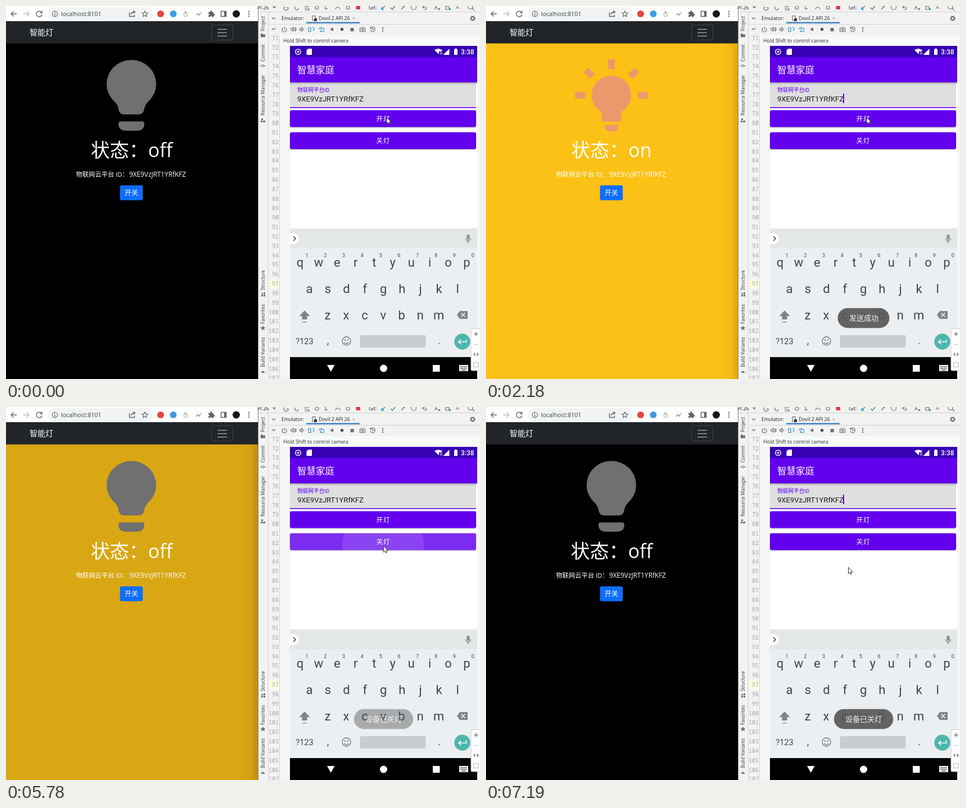
Recreate the animation shown at these times as an HTML page. Size 843x664 px, loop 7.49 s.

```html
<!DOCTYPE html>
<html lang="zh">
<head>
<meta charset="utf-8">
<title>智能灯</title>
<style>
  html, body { margin: 0; width: 100%; height: 100%; overflow: hidden; background: #fff; }
  svg { display: block; }
  text { font-family: "Open Sans", "Noto Sans CJK SC", "Noto Sans CJK", sans-serif; white-space: pre; }
  .app text { font-family: Roboto, "Noto Sans CJK SC", "Noto Sans CJK", sans-serif; }
  .mid { text-anchor: middle; }
  .line { fill: none; stroke: #5f6368; stroke-width: 1.4; }
  .ide .line { stroke: #6e6e6e; stroke-width: 1.2; }
  .side text { font-size: 8.3px; fill: #333; }
  #nums text { font: 10px "Noto Sans Mono", monospace; fill: #a8a8a8; text-anchor: end; }
  #keys text { fill: #37474f; text-anchor: middle; }
  .btn { fill: #6200ee; filter: drop-shadow(0 1px 1px rgba(0,0,0,.28)); }
  .toast, .ripple, #glow, #on, #caret { opacity: 0; }
  .toast rect { fill: #555; fill-opacity: .91; }
  .toast text { font-size: 13px; fill: #f2f2f2; text-anchor: middle; }
  .wave { transform-box: fill-box; transform-origin: center; }
</style>
</head>
<body>
<svg width="843" height="664" viewBox="0 0 843 664">
  <defs>
    <linearGradient id="shade"><stop offset="0" stop-opacity="0"/><stop offset=".6" stop-opacity=".04"/><stop offset="1" stop-opacity=".14"/></linearGradient>
    <linearGradient id="drop" x2="0" y2="1"><stop offset="0" stop-opacity=".25"/><stop offset="1" stop-opacity="0"/></linearGradient>
    <clipPath id="clip1"><rect x="505" y="185.500" width="331" height="30" rx="3"/></clipPath>
    <clipPath id="clip2"><rect x="505" y="224.700" width="331" height="30" rx="3"/></clipPath>
  </defs>

  <!-- web page -->
  <rect y="66" width="448" height="598"/>
  <rect id="glow" y="66" width="448" height="598" fill="#fbc116"/>
  <rect x="420" y="66" width="28" height="598" fill="url(#shade)"/>
  <rect y="27" width="448" height="39.600" fill="#212529"/>
  <text x="42" y="52" font-size="14" font-weight="500" fill="#fff">智能灯</text>
  <rect x="365.500" y="33.500" width="38" height="27" rx="3" fill="none" stroke="#fff" stroke-opacity=".14"/>
  <path d="M376 41.500h17M376 47.500h17M376 53.500h17" stroke="#9b9da0" stroke-width="1.300"/>

  <g id="off">
    <path fill="#707070" d="M179 139a44 43 0 0 1 88 0c0 12-5 21-11 28q-9 8-10 16q-1 10-11 10h-24q-10 0-11-10q-1-8-10-16c-6-7-11-16-11-28zM204 205.500h38q4 0 4 4 0 12.500-14 12.500h-18q-14 0-14-12.500 0-4 4-4z"/>
    <text class="mid" x="223.500" y="268.700" font-size="34" fill="#fff">状态：off</text>
  </g>
  <g id="on">
    <g fill="#eb996c">
      <path d="M188 159a35 35 0 0 1 70 0c0 13-7 23-17.500 30v12q0 5-5 5h-25q-5 0-5-5v-12c-10.500-7-17.500-17-17.500-30zM211 211.500h24v3q0 9-9 9h-6q-9 0-9-9z"/>
      <path d="M217 95h12v17.500h-12zM158.500 153h17.500v12h-17.500zM270 153h17.500v12h-17.500z"/>
      <path d="M-8.500-6h17v12h-17z" transform="translate(183.500 119.800) rotate(45)"/>
      <path d="M-8.500-6h17v12h-17z" transform="translate(262.500 119.800) rotate(-45)"/>
    </g>
    <text class="mid" x="223" y="268.700" font-size="34" fill="#fff">状态：on</text>
  </g>
  <g fill="#fff" font-weight="500">
    <text x="124.500" y="304" font-size="11.300">物联网云平台 ID：</text>
    <text x="219" y="304" font-size="11.800">9XE9VzJRT1YRfKFZ</text>
  </g>
  <rect x="202.700" y="319.300" width="40.600" height="26.400" rx="3" fill="#0d6efd"/>
  <text class="mid" x="223" y="337" font-size="12" fill="#fff">开关</text>

  <!-- browser bar -->
  <rect width="448" height="27" fill="#fff"/>
  <rect x="75" y="2" width="186" height="24" rx="12" fill="#f1f3f4"/>
  <path class="line" d="M19 14H9M13.500 9.500L9 14l4.500 4.500M63 11a5 5 0 1 0 1 4M64 8.500v3.500h-3.500M219.500 11.500v7h9v-3M222 15q1-4 7-4.500M226.500 8l3 2.500-3 2.500"/>
  <path class="line" style="stroke:#bcbec1" d="M31 14h10M36.500 9.500L41 14l-4.500 4.500"/>
  <circle class="line" cx="87" cy="14" r="4.600" style="stroke-width:1.100"/>
  <path d="M87 11.200v1.200M87 13.500v3.200" stroke="#5f6368" stroke-width="1.300"/>
  <text x="98" y="17.800" font-size="10.600" fill="#3c4043">localhost:8101</text>
  <path class="line" style="stroke-width:1.100" d="M247 9l1.500 3.300 3.600.4-2.700 2.400.8 3.600-3.200-1.900-3.200 1.900.8-3.600-2.700-2.400 3.600-.4z"/>
  <circle cx="275" cy="14" r="6" fill="#e2463f"/>
  <circle cx="297.500" cy="14" r="6" fill="#3f9be0"/>
  <rect x="316.500" y="11" width="6" height="8" rx="3" fill="none" stroke="#999"/>
  <path d="M319.500 15v-4q0-2-2-3" fill="none" stroke="#999"/>
  <path d="M337 18l4-6 2 3 5-6-4 9-2-3z" fill="#a0a0a0"/>
  <path d="M360 11h3q-.5-3 1.500-3t1.500 3h3v3q2.500-.5 2.500 1.500t-2.500 1.500v2.500h-3.500q0-2-1.200-2t-1.200 2H360v-3q2 0 2-1.300t-2-1.300z" fill="#5f6368"/>
  <path d="M382.500 9.500h9v9h-9z" class="line"/><path d="M388 9h4v10h-4z" fill="#5f6368"/>
  <circle cx="409.500" cy="14" r="6.500" fill="#161616"/>
  <g fill="#5f6368"><circle cx="432" cy="10" r="1.200"/><circle cx="432" cy="14" r="1.200"/><circle cx="432" cy="18" r="1.200"/></g>

  <!-- editor window -->
  <g class="ide">
    <rect x="448" width="395" height="664" fill="#f2f2f2"/>
    <path d="M448.500 0v664" stroke="#858585"/>
    <path d="M449 10.500h394M466.500 11v653M467 32.500h376M486.500 51v613" stroke="#d3d3d3" fill="none"/>
    <text x="447" y="6" font-size="9" fill="#222">PI 26</text>
    <path d="M474 1h6l-3 3.500z" fill="#6e6e6e"/>
    <g class="line">
      <path d="M495 1a4 4 0 1 0 7 2h-4M514 1v3a3 3 0 0 0 6 0M531 1h8M531 4h5M531 7h8M537 4l3 3M568 0v6l4-2M586 6a4 4 0 0 1 8 0M741 2h5a2 2 0 0 1 0 4h-3M743 0l-2 2 2 2M762 6l3-5 3 5M782 1h6v5h-6zM800 5l3-4 3 4M829 4l4 4"/>
      <circle cx="553" cy="3" r="3"/><circle cx="608" cy="3" r="3"/><circle cx="725" cy="2" r="4.500"/><circle cx="826" cy="1.500" r="4"/>
      <path d="M674 0l-6 6M668 2v4h4" style="stroke:#3592c4;stroke-width:1.600"/>
      <path d="M684 3l3 3 5-6M703 6l6-6M705 0h4" style="stroke:#499c54;stroke-width:1.600"/>
    </g>
    <path d="M622.500 0h7.500v6h-7.500z" fill="#db3b4b"/>
    <path d="M769 4h3v3h-3zM788 4h3v3h-3z" fill="#3592c4"/>
    <text x="645" y="5.500" font-size="9" fill="#222">Git:</text>

    <g fill="#222" font-size="8.800">
      <text x="490" y="25">Emulator:</text>
      <text x="556" y="25">Dovil 2 API 26</text>
    </g>
    <rect x="534" y="28.500" width="95" height="2.500" fill="#4083c9"/>
    <path class="line" d="M473 20.500l3 3 3-3M473 39.500l3 3 3-3M545 17.500h5v8h-5z"/>
    <path d="M548 22h5v5h-5z" fill="#333"/>
    <path d="M616.500 20l4 4M620.500 20l-4 4" stroke="#aaa"/>
    <circle cx="830" cy="22" r="3" fill="none" stroke="#6e6e6e" stroke-width="2"/>
    <circle cx="830" cy="22" r="4.300" fill="none" stroke="#6e6e6e" stroke-dasharray="1.700 1.700"/>

    <g class="line">
      <path d="M492.500 39a4 4 0 1 0 5 0M495 37v5M507 40h2l2-2v7l-2-2h-2zM513 39q2 2.500 0 5M514.500 38q3 3.500 0 7M522.500 40h2l2-2v7l-2-2h-2zM528.500 39.500q1.500 2 0 4"/>
      <path d="M538 38.500h4v7h-4zM558 38.500h4M545 38q3 0 3 4l-2 2M559 45.500h6v-6h-4zM557 42v-3" style="stroke:#3592c4"/>
      <path d="M629.500 39.500h2l1-1.500h3l1 1.500h2v6h-9zM648.500 39a4.300 4.300 0 1 1-.5 4M648 37v3h3M652 39v3h2.500"/>
      <circle cx="634" cy="42.300" r="1.600"/>
    </g>
    <path d="M576 41.500l6-3.500v7zM612.500 39h6v6h-6z" fill="#6e6e6e"/>
    <g fill="#555"><circle cx="597.500" cy="41.500" r="2.800"/><circle cx="670" cy="38.500" r="1.100"/><circle cx="670" cy="41.700" r="1.100"/><circle cx="670" cy="45" r="1.100"/></g>
    <rect x="487" y="52" width="356" height="19" fill="#f7fbf8"/>
    <text x="493" y="65" font-size="8.900" fill="#222">Hold Shift to control camera</text>
    <rect x="487" y="71" width="356" height="593" fill="#f6f6f6"/>
    <rect x="467" y="486" width="19" height="17" fill="#fcfae0"/>
    <g id="nums"></g>
    <g class="side" id="side"></g>
    <g fill="#6e6e6e">
      <path d="M453 49h3l1 1.500h4v5h-8zM454 200h3v3h-3zM457 204h4v3h-4zM453 204h3v3h-3zM454 511h3v2h-3zM458 510h3v3h-3zM454 514h3v3h-3zM458 514h3v3h-3zM453 653l4-4 4 4z"/>
      <path d="M457 568.500l1.300 3.200 3.500.2-2.700 2.200 1 3.400-3.100-1.900-3.100 1.900 1-3.400-2.700-2.200 3.500-.2z"/>
      <path d="M452 106.500h10" stroke="#6e6e6e"/><circle cx="457" cy="106.500" r="2" fill="#f2f2f2" stroke="#6e6e6e"/>
    </g>
  </g>

  <!-- phone -->
  <g class="app">
    <rect x="505" y="71" width="333" height="593" fill="#fff"/>
    <rect x="505" y="71" width="333" height="20" fill="#3700b3"/>
    <rect x="505" y="91" width="333" height="45" fill="#6200ee"/>
    <circle cx="519.500" cy="81.500" r="4.700" fill="none" stroke="#dcd3f2" stroke-width="1.800"/><circle cx="519.500" cy="81.500" r="2" fill="#dcd3f2"/>
    <path d="M537 76h7v11h-9.500v-8zM762 78.500q7-5 14 0l-3 4v-1.500h-3v5zM788.500 76v11h-11zM797 77h1.500v-1.500h3V77h1.500v10h-6z" fill="#fff"/>
    <path d="M772 82.500l4 4M776 82.500l-4 4" stroke="#fff"/>
    <text x="809" y="86" font-size="12" font-weight="500" fill="#fff">3:38</text>
    <text x="518" y="120" font-size="16.500" fill="#fff">智慧家庭</text>

    <rect x="505" y="136" width="331" height="45" fill="#dfdfdf"/>
    <rect x="505" y="136" width="333" height="4" fill="url(#drop)"/>
    <rect x="505" y="180" width="331" height="1.600" fill="#6200ee"/>
    <text x="518" y="153" font-size="9.700" fill="#6200ee">物联网平台ID</text>
    <text x="518" y="169.700" font-size="13" fill="#1c1c1c">9XE9VzJRT1YRfKFZ</text>
    <rect id="caret" x="635" y="156" width="2" height="17" fill="#6200ee"/>

    <rect class="btn" x="505" y="185.500" width="331" height="30" rx="3"/>
    <rect class="btn" x="505" y="224.700" width="331" height="30" rx="3"/>
    <g clip-path="url(#clip1)"><g class="ripple" id="ripple1" fill="#fff">
      <rect x="505" y="185" width="331" height="31" fill-opacity=".17"/><circle class="wave" cx="675" cy="199" r="170" fill-opacity=".12"/>
    </g></g>
    <g clip-path="url(#clip2)"><g class="ripple" id="ripple2" fill="#fff">
      <rect x="505" y="224" width="331" height="31" fill-opacity=".17"/><circle class="wave" cx="670.500" cy="247" r="170" fill-opacity=".12"/>
    </g></g>
    <g fill="#fff" font-size="11.500" font-weight="500" letter-spacing="1">
      <text x="658.500" y="205">开灯</text><text x="658.500" y="244">关灯</text>
    </g>

    <rect x="505" y="396" width="333" height="230" fill="#eceff1"/>
    <rect x="505" y="396" width="333" height="35" fill="#e4e7e8"/>
    <path d="M505 404h6a10 10 0 0 1 0 20h-6z" fill="#fff"/>
    <path d="M511 410l4 4-4 4" fill="none" stroke="#444" stroke-width="1.600"/>
    <rect x="819.500" y="407" width="5" height="9" rx="2.500" fill="#858c90"/>
    <path d="M817.500 413.500a4.500 4.500 0 0 0 9 0M822 418v4" fill="none" stroke="#858c90" stroke-width="1.500"/>
    <g id="keys"></g>
    <path d="M531 542l9.500 10h-5v6h-9v-6h-5zM527 562h8v1.300h-8zM807 543h14v14h-14l-5-7z" fill="#7b868c"/>
    <path d="M809.500 546.500l7 7M816.500 546.500l-7 7" stroke="#eceff1" stroke-width="1.600"/>
    <g fill="none" stroke="#717d83" stroke-width="1.400"><circle cx="605.500" cy="596.500" r="7.500"/><path d="M601.500 599q4 4 8 0"/></g>
    <g fill="#717d83"><circle cx="603" cy="594.500" r="1.200"/><circle cx="608" cy="594.500" r="1.200"/></g>
    <rect x="629.500" y="586" width="117" height="22" rx="2.500" fill="#c9cdd0"/>
    <circle cx="811.500" cy="597.500" r="14.200" fill="#4db6ac"/>
    <path d="M818.500 593.500v4.500h-13M809 594l-4 4 4 4" fill="none" stroke="#fff" stroke-width="1.700"/>

    <rect x="505" y="625" width="333" height="39"/>
    <path d="M571 639h13.500l-6.700 12zM759 639h12.500v12H759zM806 639h16v11h-16z" fill="#fff"/>
    <circle cx="671.500" cy="645" r="6.500" fill="#fff"/>
    <path d="M808 642h12M808 645h12" stroke="#000" stroke-width="1.500" stroke-dasharray="1.500 1"/><path d="M810 648h8" stroke="#000"/>

    <g class="toast" id="sent"><rect x="625.500" y="537.700" width="92" height="35.500" rx="17.700"/><text x="672" y="560">发送成功</text></g>
    <g class="toast" id="lit"><rect x="618.800" y="537.700" width="105.400" height="35.500" rx="17.700"/><text x="671.500" y="560">设备已开灯</text></g>
    <g class="toast" id="dark"><rect x="618.800" y="537.700" width="105.400" height="35.500" rx="17.700"/><text x="671.500" y="560">设备已关灯</text></g>
  </g>

  <rect x="827" y="574.500" width="20" height="74.500" rx="2" fill="#fff" stroke="#ccc"/>
  <path d="M832.500 584h7M836 580.500v7" stroke="#555" stroke-width="1.200"/>
  <path d="M832.500 602.500h7" stroke="#bbb"/>
  <text class="mid" x="836" y="623" font-size="7" font-weight="700" fill="#444">1:1</text>
  <path d="M831.500 634.500h9v8h-9zM833.500 640.500v-1.500M838.500 636.500v1.500" fill="none" stroke="#bbb"/>

  <path id="mouse" d="M.5.500v11l2.500-2.300 1.700 3.800 1.700-.8-1.600-3.600h3.500z" fill="#fff" stroke="#222" stroke-width=".9"/>
</svg>
<script>
const LOOP = 7490;
const $ = id => document.getElementById(id);
const label = (box, str, attrs) => {
  const el = document.createElementNS('http://www.w3.org/2000/svg', 'text');
  for (const k in attrs) el.setAttribute(k, attrs[k]);
  el.textContent = str;
  box.append(el);
};

for (let n = 71; n <= 107; n++) label($('nums'), n, { x: 485, y: 60.8 + (n - 71) * 16.82 });

[['Project', 45], ['Commit', 99], ['Resource Manager', 195], ['Structure', 506],
 ['Favorites', 566], ['Build Variants', 643]].forEach(([s, y]) =>
  label($('side'), s, { transform: `translate(460 ${y}) rotate(-90)` }));

[['qwertyuiop', 523, 464], ['asdfghjkl', 539.5, 511], ['zxcvbnm', 572, 558]].forEach(([row, x, y]) =>
  [...row].forEach((c, i) => label($('keys'), c, { x: x + i * 32.95, y, 'font-size': 22 })));
[...'1234567890'].forEach((c, i) =>
  label($('keys'), c, { x: 535 + i * 32.8, y: 446.5, 'font-size': 9 }));
label($('keys'), '?123', { x: 531, y: 602, 'font-size': 14.5 });
label($('keys'), ',', { x: 572.5, y: 602, 'font-size': 18 });
label($('keys'), '.', { x: 770, y: 602, 'font-size': 18 });

// steps: [time, value, easing to the next step]
function track(el, prop, steps, ease = 'linear') {
  const all = [[0, steps[0][1]], ...steps, [LOOP, steps[steps.length - 1][1]]];
  el.animate(all.map(([t, v, e]) => ({ offset: t / LOOP, [prop]: v, easing: e || ease })),
    { duration: LOOP, iterations: Infinity });
}
const HOLD = 'steps(1, end)';
const flip = (el, first, times) =>
  track(el, 'opacity', [[0, first], ...times.map((t, i) => [t, (i + 1 + first) % 2])], HOLD);
const fade = (el, t0, t1, t2, t3) =>
  track(el, 'opacity', [[t0, 0], [t1, 1], [t2, 1], [t3, 0]]);

const ON = 495, OFF = 5505, EASE = 'ease-in-out';
track($('glow'), 'opacity', [[ON, 0, EASE], [ON + 1095, 1], [OFF, 1, EASE], [OFF + 1090, 0]]);
flip($('on'), 0, [ON, OFF]);
flip($('off'), 1, [ON, OFF]);
flip($('caret'), 0, [210, 690, 1150, 1700, 2180, 2650, 3180, 3670, 4150, 4670, 5220, 5700, 6160, 6720, 7190]);

function ripple(el, t) {
  fade(el, t, t + 120, t + 430, t + 700);
  track(el.querySelector('.wave'), 'transform',
    [[t, 'scale(0)'], [t + 410, 'scale(.425)'], [t + 700, 'scale(1)']]);
}
ripple($('ripple1'), 370);
ripple($('ripple2'), 5370);

fade($('sent'), 640, 1040, 2640, 2960);
fade($('lit'), 2760, 3330, 4660, 5070);
track($('dark'), 'opacity', [[5600, 0], [5970, 1]]);

const at = (x, y) => `translate(${x}px, ${y}px)`;
track($('mouse'), 'transform', [
  [0, at(676.5, 198), HOLD], [3670, at(681, 305)], [3820, at(681, 304)], [4150, at(676, 272)],
  [4520, at(671, 247)], [6010, at(671, 247)], [6085, at(667, 258), HOLD], [6160, at(644, 285)]
]);
</script>
</body>
</html>
```
